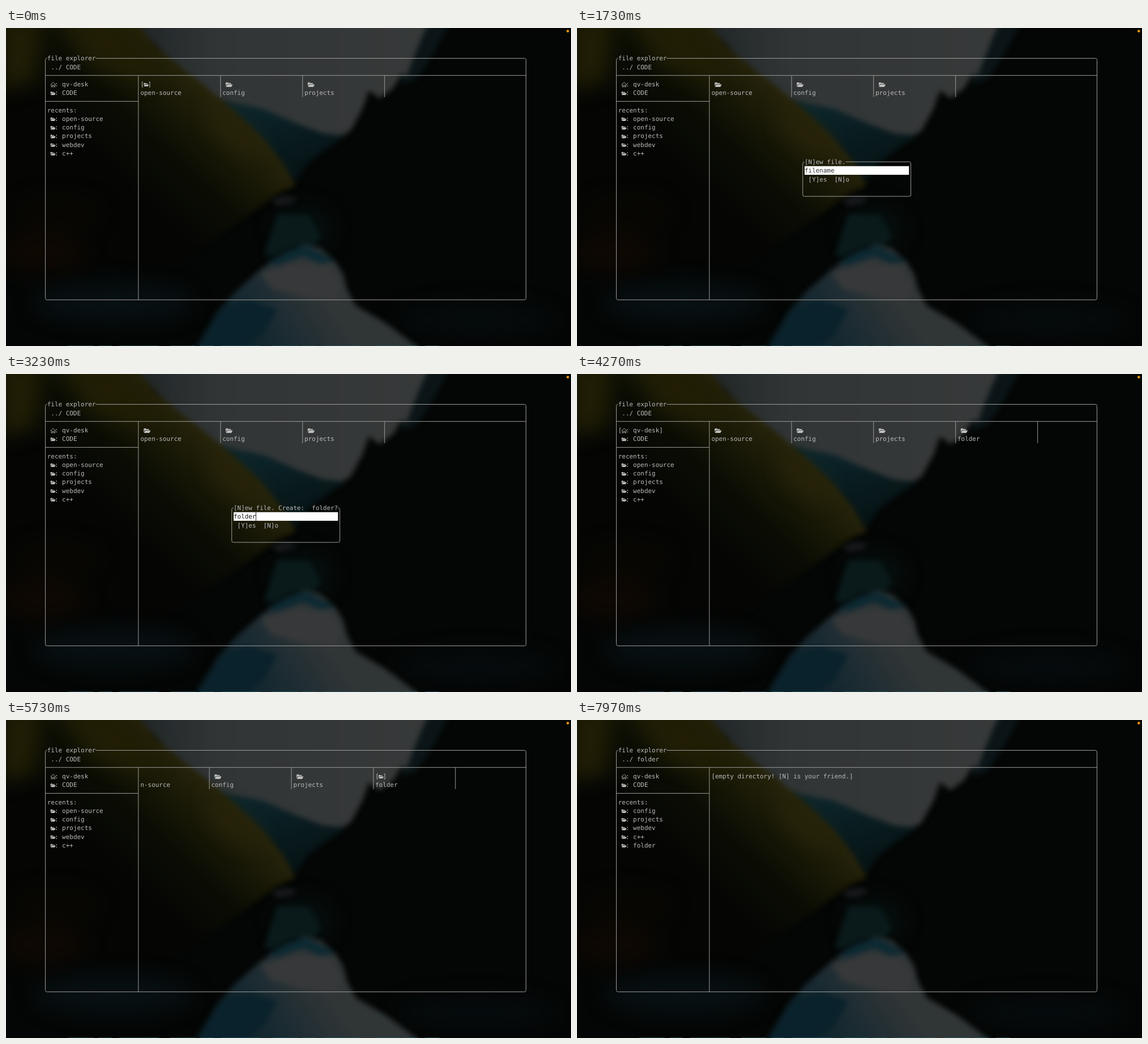
These frames come from a looping animation (998 by 561 pixels, 8000 ms). An HTML page:

```html
<!DOCTYPE html>
<html lang="en">
<head>
<meta charset="utf-8">
<title>file explorer</title>
<style>
  html, body { margin: 0; width: 100%; height: 100%; overflow: hidden; background: #040605; }
  svg { display: block; width: 100vw; height: 100vh; }
  filter { color-interpolation-filters: sRGB; }
  text {
    font: 10.94px "DejaVu Sans Mono", "Liberation Mono", monospace;
    fill: #bababa; white-space: pre; text-rendering: geometricPrecision;
  }
  .line { fill: none; stroke: #9c9c98; stroke-width: 1; }
  .icon { fill: #c0c0be; }
  .home { fill: none; stroke: #b4b4b2; stroke-width: .9; }
  .ink { fill: #161616; }
  .hint { fill: #333; }
</style>
</head>
<body>
<svg viewBox="0 0 998 561" preserveAspectRatio="none">
  <defs>
    <filter id="soft" x="-20%" y="-20%" width="140%" height="140%"><feGaussianBlur stdDeviation="5"/></filter>
    <filter id="haze" x="-20%" y="-20%" width="140%" height="140%"><feGaussianBlur stdDeviation="17"/></filter>
    <linearGradient id="sky"><stop offset="0" stop-color="#1f2527"/><stop offset=".3" stop-color="#313536"/><stop offset="1" stop-color="#373939"/></linearGradient>
    <linearGradient id="ridge" gradientUnits="userSpaceOnUse" x1="450" y1="135" x2="505" y2="270"><stop offset="0" stop-color="#0c252a"/><stop offset="1" stop-color="#061214"/></linearGradient>
    <linearGradient id="hill" gradientUnits="userSpaceOnUse" x1="370" y1="105" x2="210" y2="275"><stop offset="0" stop-color="#29260b"/><stop offset=".28" stop-color="#1b1a07"/><stop offset=".6" stop-color="#0b0d04"/><stop offset="1" stop-color="#050604"/></linearGradient>
    <linearGradient id="lake" gradientUnits="userSpaceOnUse" x1="370" y1="540" x2="530" y2="430"><stop offset="0" stop-color="#0a2029"/><stop offset=".5" stop-color="#1b2b32"/><stop offset="1" stop-color="#303536"/></linearGradient>
    <clipPath id="pane"><path d="M237 70H918V480H237Z"/></clipPath>
  </defs>

  <rect width="998" height="561" fill="#040605"/>
  <g filter="url(#soft)">
    <path fill="#0b1517" d="M690-20H790L752 50 725 90 700 100Z"/>
    <path fill="url(#sky)" d="M215-20H752L732 22 716 62 708 84 698 82 684 106 660 124 641 110 630 142 608 182 580 196 380 150Z"/>
    <path fill="url(#ridge)" d="M370 122L400 132 455 143 515 169 560 186 600 190 565 214 532 240 512 270 470 240Z"/>
    <path fill="url(#hill)" d="M-20-20H222L262 32 310 70 352 103 405 148 455 196 488 236 512 278 485 290 300 420-20 430Z"/>
  </g>
  <g filter="url(#haze)">
    <path fill="#211e05" d="M-10-20H65L50 95-10 110ZM95-20H200L275 65 240 95 150 65Z"/>
    <path fill="#282409" d="M355 130L410 170 455 215 430 225 370 185Z"/>
    <ellipse cx="90" cy="325" rx="75" ry="26" fill="#090703"/>
    <ellipse cx="65" cy="395" rx="75" ry="38" fill="#0e0803"/>
    <ellipse cx="190" cy="485" rx="140" ry="35" fill="#071013"/>
    <ellipse cx="830" cy="515" rx="140" ry="28" fill="#060b0d"/>
    <ellipse cx="525" cy="355" rx="50" ry="40" fill="#06100f"/>
  </g>
  <g filter="url(#soft)">
    <path fill="#17191b" d="M468 304L490 296 514 299 506 309 480 314Z"/>
    <path fill="#0a1a1b" d="M480 328L535 330 556 368 542 384 505 384 474 402 455 402Z"/>
    <path fill="url(#lake)" d="M528 382L556 389 582 412 596 435 602 460 618 490 670 520 750 580H325L374 500 404 466 452 424 492 398Z"/>
    <path fill="#0d2932" d="M460 414L500 392 530 384 583 411 555 416 525 403 480 418Z"/>
    <path fill="#363839" d="M450 432L505 415 570 418 594 452 584 482 525 475 468 460Z"/>
    <path fill="#0a222b" d="M385 492L430 480 480 496 455 540 405 575H332Z"/>
  </g>
  <path d="M110 560.5H765" stroke="#1d555f" stroke-width="1" stroke-dasharray="45 8 24 13 70 20" opacity=".75"/>
  <circle cx="992.3" cy="5.5" r="2.3" fill="#f59a0c"/>

  <g class="line">
    <path d="M158.5 53.5H915.5Q918.5 53.5 918.5 56.5V476.6Q918.5 479.6 915.5 479.6H72.5Q69.5 479.6 69.5 476.6V56.5Q69.5 53.5 72.5 53.5"/>
    <path d="M69.5 83.7H918.5M69.5 129.4H233.8M233.8 83.7V479.6"/>
  </g>
  <g id="ui"></g>
</svg>
<script>
const CELL = 6.585, ROW = 15.225, LEFT = 66.2, TOP = 53.4;
const HOME = "qv-desk";
const ui = document.getElementById("ui");
const colX = c => LEFT + c * CELL;
const midX = c => colX(c + .5);
const rowY = r => TOP + r * ROW;

const text = (c, r, s, cls = "") =>
  `<text class="${cls}" x="${colX(c)}" y="${rowY(r) + 4}">${s}</text>`;

const folder = (c, r, scale) =>
  `<path class="icon" transform="translate(${colX(c) - .7} ${rowY(r) + 1}) scale(${scale})"
    d="M0 3V-3.4Q0-4.2.8-4.2H3.6L4.7-3H8.4Q9.2-3 9.2-2.2V-1.4H3Q2.3-1.4 1.9-.8ZM.4 4L2.5-.2Q2.7-.6 3.2-.6H11.6Q12.3-.6 11.9.1L10.1 3.5Q9.8 4 9.3 4Z"/>`;

const house = (c, r) =>
  `<path class="home" transform="translate(${colX(c) - .4} ${rowY(r) + .7})"
    d="M-.2.3L4.3-4 8.8.3M1.1-.7V4.2H3.2V1.2H5.4V4.2H7.5V-.7"/>`;

// Keyboard actions, each merged into the state from its time on.
const steps = [
  [0, { path: "CODE", focus: 0, dialog: false, typed: "", items: ["open-source", "config", "projects"],
        recents: ["open-source", "config", "projects", "webdev", "c++"] }],
  [1150, { focus: "none", dialog: true }],
  ...[..."folder"].map((_, i) => [2050 + i * 140, { typed: "folder".slice(0, i + 1) }]),
  [3750, { dialog: false, focus: "home", items: ["open-source", "config", "projects", "folder"] }],
  ...[0, 1, 2, 3].map(i => [4600 + i * 240, { focus: i }]),
  [6350, { path: "folder", focus: "home", items: [], recents: ["config", "projects", "webdev", "c++", "folder"] }],
  [7350, { focus: 0 }]
];

function sidebar({ path, focus, recents }) {
  const onHome = focus === "home";
  return text(1, 0, "file explorer") + text(2, 1, "../ " + path) +
    (onHome ? text(1, 3, "[") : "") + house(2, 3) +
    text(3, 3, `: ${HOME}${onHome ? "]" : ""}`) +
    folder(2, 4, .74) + text(3, 4, ": CODE") + text(1, 6, "recents:") +
    recents.map((name, i) => folder(2, 7 + i, .74) + text(3, 7 + i, ": " + name)).join("");
}

function pane({ items, focus }) {
  if (!items.length) {
    const note = "empty directory! [N] is your friend.";
    return focus === 0 ? text(26, 3, `[${note}]`) : text(27, 3, note);
  }
  const scroll = focus === 3 ? 3 : 0;
  const tiles = items.map((name, i) => {
    const c = 26 + i * 22 - scroll, on = focus === i;
    return (on ? text(c, 3, "[") + text(c + 2, 3, "]") : "") +
      folder(c + 1, 3, on ? .74 : 1) + text(c, 4, name) +
      `<path class="line" d="M${midX(c + 21)} ${rowY(2)}V${rowY(4.5)}"/>`;
  });
  return `<g clip-path="url(#pane)">${tiles.join("")}</g>`;
}

function dialog({ typed }) {
  const title = "[N]ew file." + (typed && ` Create:  ${typed}?`);
  const l = midX(50), r = midX(79), t = rowY(12), b = rowY(16), end = colX(51 + title.length);
  const caret = colX(51 + typed.length);
  return `<path class="line" d="M${end} ${t}H${r - 3}Q${r} ${t} ${r} ${t + 3}V${b - 3}Q${r} ${b} ${r - 3} ${b}H${l + 3}Q${l} ${b} ${l} ${b - 3}V${t + 3}Q${l} ${t} ${l + 3} ${t}"/>
    <rect x="${colX(51)}" y="${rowY(12.5)}" width="${28 * CELL}" height="${ROW}" fill="#fff"/>` +
    text(51, 12, title) +
    (typed ? text(51, 13, typed, "ink") +
      `<path d="M${caret} ${rowY(12.5)}V${rowY(13.5)}" stroke="#222"/>` : text(51, 13, "filename", "hint")) +
    text(52, 14, "[Y]es  [N]o");
}

let shown = -1;
function frame() {
  const time = performance.now() % 8000;
  const count = steps.filter(([at]) => at <= time).length;
  if (count !== shown) {
    shown = count;
    const state = Object.assign({}, ...steps.slice(0, count).map(step => step[1]));
    ui.innerHTML = sidebar(state) + pane(state) + (state.dialog ? dialog(state) : "");
  }
  requestAnimationFrame(frame);
}
frame();
</script>
</body>
</html>
```
